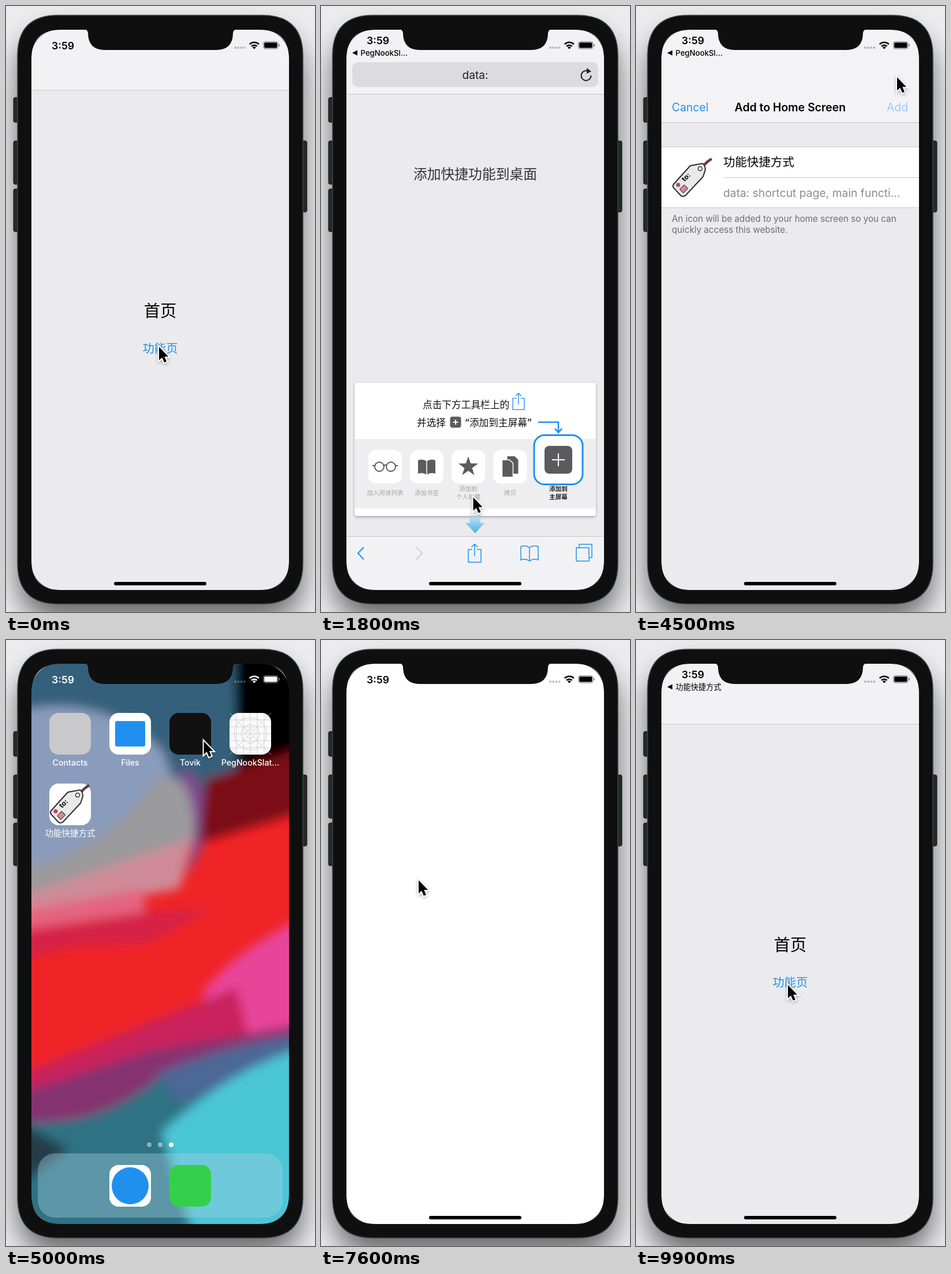
An HTML page for the animation above (10 s loop, 535 by 1047 pixels).

```html
<!DOCTYPE html>
<html lang="zh-CN">
<head>
<meta charset="utf-8">
<title>Home screen shortcut</title>
<style>
html, body { margin: 0; width: 100%; height: 100%; overflow: hidden; background: #ececee; }
svg { display: block; width: 535px; height: 1047px; font-family: Inter, "Noto Sans CJK SC", "Noto Sans CJK", sans-serif; }
text { white-space: pre; }
</style>
</head>
<body>
<svg id="stage" viewBox="0 0 535 1047"></svg>
<script>
const BLUE = '#2090ee', DARK = '#5b5b5d', PAGE = '#ebebed', BAR = '#f2f2f4', LINE = '#c6c6c8';

// Markup helpers
const rect = (x, y, w, h, r, fill, more = '') =>
  `<rect x="${x}" y="${y}" width="${w}" height="${h}" rx="${r}" fill="${fill}" ${more}/>`;
const circle = (x, y, r, fill, more = '') => `<circle cx="${x}" cy="${y}" r="${r}" fill="${fill}" ${more}/>`;
const text = (x, y, size, str, fill = '#000', anchor = 'middle', weight = 400) =>
  `<text x="${x}" y="${y}" font-size="${size}" fill="${fill}" text-anchor="${anchor}" font-weight="${weight}">${str}</text>`;
const path = (d, fill, more = '') => `<path d="${d}" fill="${fill}" ${more}/>`;
const line = (d, color, width, more = '') => path(d, 'none', `stroke="${color}" stroke-width="${width}" ${more}`);
const at = (x, y, body, scale = 1) => `<g transform="translate(${x} ${y}) scale(${scale})">${body}</g>`;
const group = (id, body) => `<g id="${id}">${body}</g>`;
const card = (id, body) => group(id, `<g clip-path="url(#screen)">${body}</g>`);
const rule = (y, x = 43) => rect(x, y, 491 - x, 1, 0, LINE);
const indicator = rect(187, 995, 160, 6, 3, '#000');

function status(color, back) {
  const y = back ? 65.5 : 74.5;
  const dots = [397, 402.2, 407.4, 412.6].map(x => circle(x, 72, 2, color, 'opacity=".25"')).join('');
  const wifi = line('M421.8 66a11.5 11.5 0 0 1 16 0M425 69.6a7 7 0 0 1 9.6 0', color, 2.6) +
    path('M426.8 71.6a4.3 4.3 0 0 1 6 0L429.8 74.5z', color);
  const battery = rect(445.5, 61.5, 25.5, 12.5, 3.5, 'none', `stroke="${color}" opacity=".5"`) +
    rect(447, 63, 22.5, 9.5, 2, color) + rect(472.3, 65.5, 1.5, 4.5, .8, color, 'opacity=".5"');
  const label = back ? path('M54 81l9-4.5v9z', color) + text(68.5, 85.5, 13.2, back, color, 'start', 500) : '';
  return text(79, y, 17.7, '3:59', color, 'start', 600) + label + dots + wifi + battery;
}

// Glyphs, each centred on 0,0
const plus = (r, w) => line(`M${-r} 0H${r}M0 ${-r}V${r}`, '#fff', w);
const addBox = (size, r) => rect(-size / 2, -size / 2, size, size, r, DARK) + plus(size * .23, 2);
const share = line('M-4-6H-11V16H11V-6H4M0 6V-15M-5.5-10L0-15.5L5.5-10', BLUE, 1.5);
const bookPath = 'M0-9C-4-13-11-13-15-11V12C-10 10-4 11 0 14C4 11 10 10 15 12V-11C11-13 4-13 0-9V14';
const glasses = circle(-10, 0, 8, 'none', `stroke="${DARK}" stroke-width="2"`) +
  circle(10, 0, 8, 'none', `stroke="${DARK}" stroke-width="2"`) +
  line('M-2.5-2q2.5-2 5 0M-18-2h-4M18-2h4', DARK, 2);
const book = path(bookPath, DARK) + line('M0-9V14', '#fff', 1.5);
const star = `<polygon fill="${DARK}" points="${Array.from({ length: 10 }, (_, i) => {
  const r = i % 2 ? 7 : 18, a = i * Math.PI / 5;
  return [r * Math.sin(a), -r * Math.cos(a)].map(v => v.toFixed(1));
}).join(' ')}"/>`;
const copy = path('M-5-18H8L14-12V12H-5z', DARK) +
  path('M-14-12H-1L5-6V18H-14z', DARK, 'stroke="#fff" stroke-width="1.5"');
const printer = rect(-13, -18, 26, 9, 2, DARK) + rect(-19, -8, 38, 20, 4, DARK) +
  rect(-12, 1, 24, 17, 2, DARK, 'stroke="#fff" stroke-width="2"') + line('M-7 7H7M-7 12H4', '#fff', 2);
const monitor = rect(-20, -16, 40, 27, 2, DARK) + rect(-17.5, -13.5, 35, 21, 0, '#858587') +
  path('M-4 11H4L6 16H10V18H-10V16H-6z', DARK);

// Tag picture in a 72 px box
const tag = line('M49 20C56 15 58 9 69 3', '#6b3a4a', 4.5) +
  path('M3 47L32 15L53 11Q58 14 58 22L54 34L24 66Q19 70 15 66L3 53Q1 50 3 47z', '#e9e9e9', 'stroke="#2c2c2e" stroke-width="2"') +
  circle(49, 20, 3.5, '#fff', 'stroke="#2c2c2e" stroke-width="1.5"') +
  `<text transform="translate(22 43) rotate(-45)" font-size="12" font-weight="700">to:</text>` +
  circle(11, 48, 3.5, '#c4405c') +
  `<g transform="translate(20 55) rotate(-45)">${rect(-5, -4, 11, 9, 1, '#d88a98', 'stroke="#2c2c2e"')}</g>`;

// Wallpaper: soft patches of colour
const wallpaper = rect(0, 0, 535, 1047, 0, '#f02426') + `<g filter="url(#soft)">` + [
  ['M0 0H535V260L330 300L0 260z', '#34607c'],
  ['M0 130Q150 80 270 190Q320 300 240 350L0 420z', '#8a9cbc'],
  ['M0 400Q180 370 260 240Q330 220 328 330L290 410L0 450z', '#9b9a9c'],
  ['M0 450Q190 390 325 340L300 430L0 480z', '#cf8b99'],
  ['M0 472L240 430L240 490L0 505z', '#e5647f'],
  ['M0 505L240 470L360 465L240 525L120 530L0 560z', '#d62046'],
  ['M325 230L290 225Q350 290 310 410Q350 360 350 280z', '#7e4a8e'],
  ['M395 0H535V270L400 250z', '#050304'],
  ['M345 240L535 180V290L335 350z', '#7c1018'],
  ['M535 470Q400 530 340 610L350 690L535 680z', '#e8459a'],
  ['M0 760L300 640L400 600L420 690L0 800z', '#c9245c'],
  ['M0 790L250 710L535 660V700L250 800L0 850z', '#85306f'],
  ['M0 830Q150 850 260 760L535 672V1047H0z', '#2f7284'],
  ['M260 750Q400 690 535 680V720L300 800z', '#4b6896'],
  ['M535 700Q400 730 270 850L330 1047H535z', '#4cc6d6'],
  ['M0 820L110 880L0 960z', '#263c4a']
].map(([d, c]) => path(d, c)).join('') + '</g>';

// Home screen
const label = (x, str) => text(x, 217, 14.2, str, '#fff', 'middle', 500);
const icon = (x, y, fill) => rect(x - 36, y - 36, 72, 72, 16, fill);
const gridLines = [-24, -12, 0, 12, 24].map(v => `M${v}-36V36M-36 ${v}H36`).join('') + 'M-36-36L36 36M36-36L-36 36';
const grid = line(gridLines, '#c4c4c6', .7) +
  [8, 16, 28].map(r => circle(0, 0, r, 'none', 'stroke="#c4c4c6" stroke-width=".8"')).join('');
const homeScreen = icon(111, 162, '#c9c9cb') + label(111, 'Contacts') +
  icon(215, 162, '#fff') + rect(189, 140, 52, 44, 3, BLUE) + label(215, 'Files') +
  icon(319, 162, '#111') + label(319, 'Tovik') +
  icon(423, 162, '#fafafa') + at(423, 162, grid) + label(423, 'PegNookSlat...') +
  group('shortcut', text(111, 339, 14.5, '功能快捷方式', '#fff', 'middle', 500)) +
  circle(248, 872, 4, '#fff', 'opacity=".45"') + circle(267, 872, 4, '#fff', 'opacity=".45"') + circle(286, 872, 4, '#fff') +
  rect(55, 887, 424, 111, 30, '#a5d0e0', 'opacity=".38"') +
  icon(215, 943, '#fff') + circle(215, 943, 32, BLUE) + icon(319, 943, '#35d04b') +
  group('launch', rect(0, 0, 72, 72, 16, '#fff', 'id="launchBox"') + group('launchTag', tag)) +
  status('#fff');

// App with two pages
const page = (id, title, link) => group(id, rect(43, 146, 448, 870, 0, PAGE) +
  text(267, 536.5, 28.3, title) + text(267, 598.5, 20.3, link, BLUE));
const app = page('first', '首页', '功能页') + page('second', '功能页', '添加到桌面') +
  rect(43, 40, 448, 105, 0, BAR) + rule(145) +
  group('back', line('M68 111L58 120.5L68 130', BLUE, 2.6) + text(75, 127, 19.4, 'Back', BLUE, 'start')) +
  group('plainStatus', status('#000')) + group('backStatus', status('#000', '功能快捷方式')) + indicator;

// Browser page
const tile = (x, glyph, lines) => rect(x - 29, 767, 58, 58, 13, '#fff') + at(x, 796, glyph) +
  lines.map((s, i) => text(x, (lines.length > 1 ? 838 : 845) + i * 14, 10.5, s, '#a3a3a5')).join('');
const panel = rect(58.5, 651, 417, 230, 3, '#fff', 'filter="url(#lift)"') + rect(58.5, 748, 417, 120, 0, '#eeeef0') +
  text(176, 695, 16.7, '点击下方工具栏上的', '#111', 'start') + at(342, 683, share, .9) +
  text(166, 726, 16.7, '并选择', '#111', 'start') + at(233, 719, addBox(19, 4)) +
  text(249, 726, 16.7, '“添加到主屏幕”', '#111', 'start', 500) +
  line('M376 719H411V736M405 730L411 737L417 730', BLUE, 2.6) +
  tile(111, glasses, ['加入阅读列表']) + tile(183, book, ['添加书签']) +
  tile(255, star, ['添加到', '个人收藏']) + tile(327.5, copy, ['拷贝']) +
  rect(369, 741.5, 84, 85, 18, '#fff', `stroke="${BLUE}" stroke-width="3"`) + at(411, 784, addBox(48, 8)) +
  text(411, 838, 10.5, '添加到', '#222', 'middle', 700) + text(411, 852, 10.5, '主屏幕', '#222', 'middle', 700) +
  path('M257 874H276V893H283L267 911L250 893H257z', 'url(#fall)');
const webPage = rect(43, 40, 448, 970, 0, PAGE) + rect(43, 40, 448, 113, 0, BAR) + rule(152) +
  rect(54, 97, 426, 43, 10, '#dcdcde') + text(267, 126, 19.2, 'data:', '#222') +
  line('M462.5 112.5A8.5 8.5 0 1 0 467.5 120', '#222', 2) + path('M460 107L468 113L460 117z', '#222') +
  group('progress', rect(55, 137, 424, 3, 0, BLUE, 'id="progressBar"')) +
  text(267, 299, 23.8, '添加快捷功能到桌面', '#333') + panel +
  rect(43, 917, 448, 93, 0, BAR) + rule(916) +
  line('M74 935L64 945.5L74 956', BLUE, 2) + line('M165 935L175 945.5L165 956', '#cfcfd1', 2) +
  at(266, 945, share) + at(361, 945, line(bookPath, BLUE, 1.5)) +
  at(452, 945, line('M-10-9H12V14H-10zM-5-9V-15H17V8H12', BLUE, 1.5)) + status('#000', 'PegNookSl...');

// Share sheet
const actions = [[book, 'Add', 'Bookmark'], [glasses, 'Add to', 'Reading List'], [star, 'Add to', 'Favorites'], [copy, 'Copy'],
  [rect(-20, -20, 40, 40, 2, DARK), 'Open', 'in Quav'], [addBox(35, 7), 'Add to', 'Home Screen'], [printer, 'Print'],
  [monitor, 'Request', 'Desktop Site']];
const actionRow = actions.map(([glyph, ...lines], i) => at(106 + i * 100.3, 0,
  rect(-35.5, 762, 71, 71, 14, '#fff') + at(0, 797.5, glyph) +
  lines.map((s, k) => text(0, (lines.length > 1 ? 854.5 : 861.5) + k * 15.5, 13.2, s, '#111')).join(''))).join('');
const sheet = rect(53, 582, 428, 310, 14, '#f1f1f3') + rect(70, 605, 73, 73, 15, '#fff') + circle(106.5, 641.5, 22, BLUE) +
  rect(171, 606, 71, 71, 15, '#fff') + [191, 206, 221].map(x => circle(x, 642, 5.3, DARK)).join('') +
  text(106, 705.5, 13.2, 'Jottables', '#111') + text(206.5, 705.5, 13.2, 'More', '#111') +
  rect(53, 737, 428, 1, 0, LINE) + `<g clip-path="url(#sheetClip)">${group('row', actionRow)}</g>` +
  rect(53, 902, 428, 68, 14, '#fff') + text(267, 944.5, 22.3, 'Cancel', BLUE, 'middle', 600);

const addPage = rect(43, 40, 448, 970, 0, PAGE) + rect(43, 40, 448, 162, 0, '#f3f3f5') + rule(201) +
  text(62, 182, 19.4, 'Cancel', BLUE, 'start') + text(267, 182, 19.4, 'Add to Home Screen', '#000', 'middle', 600) +
  group('addButton', text(471, 182, 19.4, 'Add', BLUE, 'end')) +
  rect(43, 243, 448, 106, 0, '#fff') + rule(243) + rule(296, 151) + rule(348) + at(62, 261, tag) +
  text(151, 276.5, 20.5, '功能快捷方式', '#000', 'start') +
  text(151, 330, 19.3, 'data: shortcut page, main functi...', '#8c8c90', 'start') +
  text(62, 373, 15.2, 'An icon will be added to your home screen so you can', '#6d6d72', 'start') +
  text(62, 392, 15.2, 'quickly access this website.', '#6d6d72', 'start') + status('#000', 'PegNookSl...');

const browser = webPage + rect(43, 40, 448, 970, 0, '#000', 'id="shade"') + group('sheet', sheet) + group('addPage', addPage) + indicator;
const blank = rect(43, 40, 448, 970, 0, '#fff') + status('#000') + indicator;

// Phone body
const button = (x, y, h) => rect(x, y, 9, h, 3, '#23292c', 'stroke="#15191b"');
const bodyEdge = 'M90 16H444Q514 16 514 86V963Q514 1033 444 1033H90Q20 1033 20 963V86Q20 16 90 16z';
const screenEdge = 'M95 40Q43 40 43 92V958Q43 1010 95 1010H439Q491 1010 491 958V92Q491 40 439 40z';
const frame = path(bodyEdge + screenEdge, '#0f0f0f', 'fill-rule="evenodd" stroke="#3c454a" stroke-width="1.5"') +
  line(screenEdge, '#0f0f0f', 2) +
  path('M134 38V40Q142 40 142 48Q143 76 171 76H364Q392 76 393 48Q393 40 401 40V38z', '#0f0f0f');
const pointer = path('M0 0V23L5.2 18.2L9 27L13 25.3L9.3 16.8H16.2z', '#000',
  'stroke="#fff" stroke-width="4" paint-order="stroke" filter="url(#lift)"');

const stage = document.getElementById('stage');
stage.innerHTML = `<defs>
  <clipPath id="screen">${rect(43, 40, 448, 970, 50, '#000')}</clipPath>
  <clipPath id="sheetClip">${rect(53, 738, 428, 154, 0, '#000')}</clipPath>
  <filter id="soft"><feGaussianBlur stdDeviation="9"/></filter>
  <filter id="lift" x="-50%" y="-50%" width="200%" height="200%"><feDropShadow dx="0" dy="2" stdDeviation="2.5" flood-opacity=".3"/></filter>
  <filter id="glow" x="-30%" y="-20%" width="160%" height="140%"><feGaussianBlur stdDeviation="24"/></filter>
  <linearGradient id="fall" x2="0" y2="1"><stop stop-color="#a8d8f8" stop-opacity="0"/><stop offset=".5" stop-color="#90d0f4"/><stop offset="1" stop-color="#48b4d8"/></linearGradient>
</defs>` + rect(0, 0, 535, 1047, 0, '#ececee') +
  rect(20, 46, 494, 1017, 70, '#000', 'opacity=".55" filter="url(#glow)"') +
  button(13, 158, 43) + button(13, 233, 75) + button(13, 316, 74) + button(512, 233, 123) +
  `<g clip-path="url(#screen)">` + wallpaper + rect(43, 40, 448, 970, 0, '#000', 'id="dim" opacity=".45"') +
  group('home', homeScreen) + card('app', app) + card('blank', blank) + card('browser', browser) +
  '</g>' + frame + group('pointer', pointer);

const el = {};
stage.querySelectorAll('[id]').forEach(e => el[e.id] = e);
const set = (id, name, value) => el[id].setAttribute(name, value);
const show = (id, on) => set(id, 'display', on ? 'inline' : 'none');
const move = (id, x, y) => set(id, 'transform', `translate(${x} ${y})`);

// Eased values between keys of the form [time, ...values]
function keys(t, list) {
  const i = list.findIndex(k => k[0] > t);
  if (i === 0) return list[0].slice(1);
  if (i < 0) return list[list.length - 1].slice(1);
  const a = list[i - 1], b = list[i], u = (t - a[0]) / (b[0] - a[0]), e = u * u * (3 - 2 * u);
  return a.slice(1).map((v, k) => v + (b[k + 1] - v) * e);
}
const ramp = (t, t0, t1, a = 0, b = 1) => keys(t, [[t0, a], [t1, b]])[0];

const pointerPath = [[0, 265, 589], [1200, 265, 589], [2100, 263, 940], [2300, 263, 940], [2500, 410, 800], [2900, 160, 800],
  [3100, 231, 808], [3400, 231, 808], [4400, 452, 123], [4700, 452, 123], [5500, 106, 287], [6400, 106, 287], [6600, 112, 300],
  [7000, 112, 300], [7300, 167, 411], [7500, 167, 411], [7600, 169, 415], [8600, 169, 415], [9200, 66, 124], [9400, 66, 124],
  [9900, 263, 596]];

// Sideways switch between two apps: [progress, scale]
const swap = (t, t0) => keys(t, [[t0, 0, 1], [t0 + 100, .45, .9], [t0 + 200, .885, .9], [t0 + 300, 1, .97], [t0 + 400, 1, 1]]);
const place = (id, offset, s) =>
  set(id, 'transform', `translate(${267 + offset * 477 * s} 525) scale(${s}) translate(-267 -525)`);

function draw(now) {
  const t = Math.floor(now % 10000 / 100) * 100;
  const late = t > 5000;
  const [p, s] = swap(t, late ? 7800 : 700);

  show('dim', t < 4600 || t > 7000);
  show('home', t >= 4600 && t < 6300);
  show('app', t < 1100 || t >= 7900);
  show('blank', t >= 6300 && t < 8200);
  show('browser', t >= 800 && t < 4900);

  place('app', late ? 1 - p : -p, s);
  place('blank', -p, s);
  place('browser', 1 - p, t < 4600 ? s : ramp(t, 4500, 4900, 1, .3));
  set('browser', 'opacity', ramp(t, 4500, 4900, 1, 0));

  const push = late ? ramp(t, 8200, 8600) - ramp(t, 9300, 9700) : ramp(t, 0, 500);
  move('first', -134 * push, 0);
  move('second', 448 * (1 - push), 0);
  set('back', 'opacity', push);
  show('plainStatus', !late);
  show('backStatus', late);

  set('progressBar', 'width', 424 * keys(t, [[700, .3], [900, .483], [1300, 1]])[0]);
  show('progress', t < 1400);
  const up = ramp(t, 2200, 2600) - ramp(t, 3300, 3600);
  set('shade', 'opacity', .41 * up);
  move('sheet', 0, 440 * (1 - up));
  move('row', ramp(t, 2500, 3000, 0, -376.5), 0);
  move('addPage', 0, ramp(t, 3300, 3800, 975, 0));
  set('addButton', 'opacity', t >= 4500 ? .42 : 1);

  const grow = ramp(t, 5900, 6300);
  const from = t < 5900 ? [75, 248, 72, 72] : [74, 249, 81, 84];
  const [x, y, w, h] = from.map((v, i) => v + ([43, 40, 448, 970][i] - v) * grow);
  move('launch', x, y);
  set('launchBox', 'width', w);
  set('launchBox', 'height', h);
  set('launchBox', 'rx', 16 + 34 * grow);
  set('launchTag', 'transform', `translate(0 ${(h - w) / 2}) scale(${w / 72})`);
  set('launchTag', 'opacity', 1 - grow);
  show('launch', t >= 5000);
  show('shortcut', t >= 5000);

  move('pointer', ...keys(t, pointerPath));
}

const start = performance.now();
(function tick() {
  draw(performance.now() - start);
  requestAnimationFrame(tick);
})();
</script>
</body>
</html>
```
